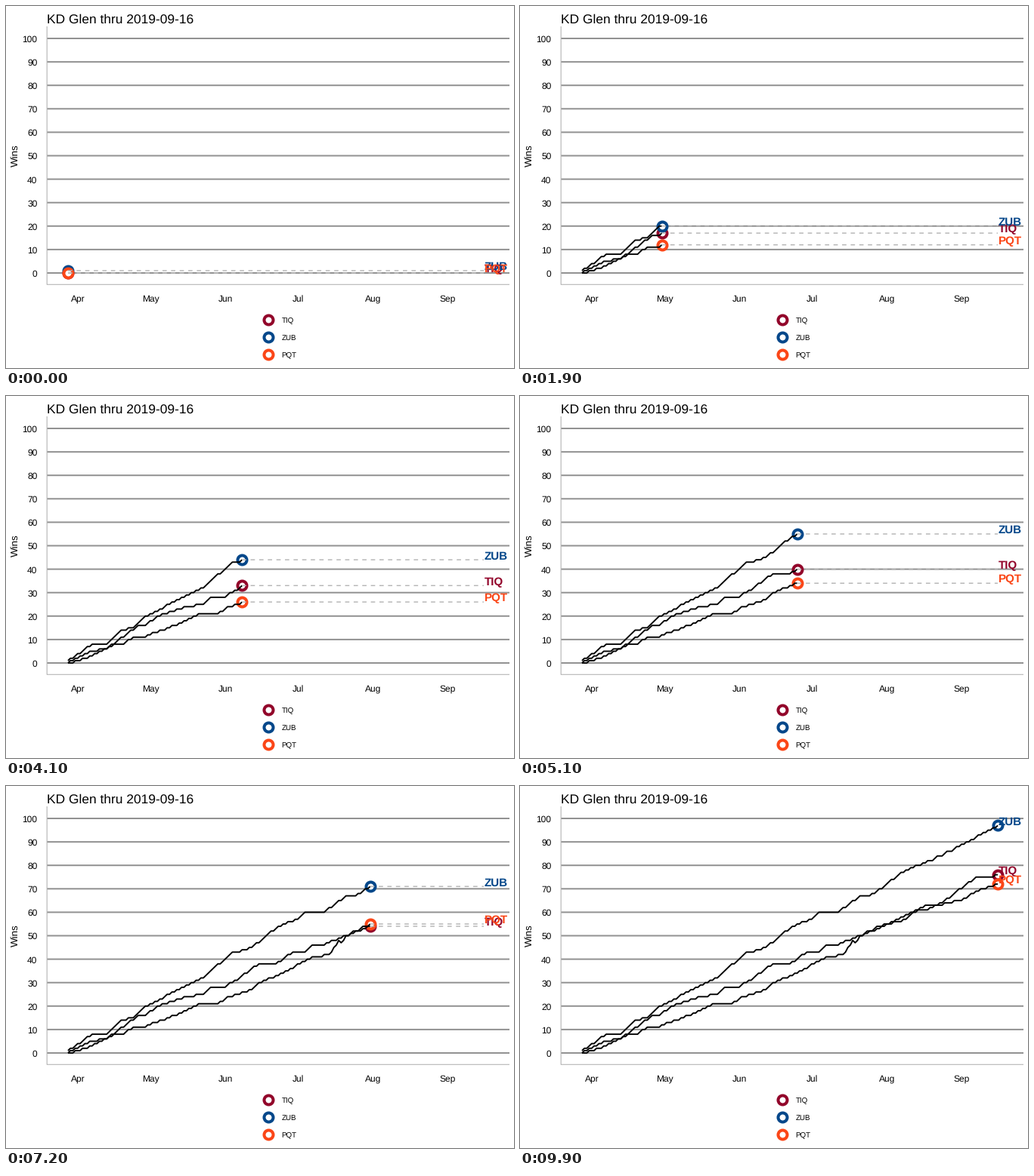
A matplotlib script that plays this animation: 672x480 px, repeating every 10000 ms.

```python
import numpy as np
import matplotlib.pyplot as plt
from matplotlib.animation import FuncAnimation

W, H, DPI = 672, 480, 96
PT = 72 / DPI                      # points per pixel
FRAMES, LAST_DAY = 100, 172
X0, X1, Y0 = 82.0, 632.0, 354.0
PER_DAY, PER_WIN = (X1 - X0) / LAST_DAY, 3.11

plt.rcParams.update({"font.family": "Liberation Sans", "text.hinting": "none"})


def win_curve(*turns):
    """Whole wins per day, moving evenly between (day, wins) turning points."""
    return np.round(np.interp(np.arange(LAST_DAY + 1), *zip(*turns)))


TEAMS = [
    ("TIQ", "#92052a", win_curve(
        (0, 0), (9, 5), (16, 6), (29, 16), (32, 16), (37, 20), (49, 24),
        (56, 25), (59, 28), (64, 28), (68, 30), (79, 38), (86, 38), (93, 43),
        (98, 43), (101, 46), (105, 46), (125, 54), (138, 61), (142, 61),
        (149, 64), (163, 75), (169, 75), (172, 76))),
    ("ZUB", "#03478a", win_curve(
        (0, 1), (10, 8), (16, 8), (22, 14), (27, 15), (31, 19), (49, 29),
        (56, 32), (68, 43), (70, 43), (76, 45), (87, 54), (95, 57), (98, 60),
        (106, 60), (115, 67), (119, 67), (125, 71), (132, 77), (144, 82),
        (156, 88), (163, 92), (172, 97))),
    ("PQT", "#fb4617", win_curve(
        (0, 0), (8, 2), (19, 8), (23, 8), (27, 11), (31, 11), (49, 18),
        (54, 21), (62, 21), (66, 24), (74, 26), (81, 31), (89, 34), (101, 41),
        (105, 41), (109, 43), (112, 48), (113, 47), (115, 50), (125, 55),
        (132, 56), (142, 63), (148, 63), (159, 66), (163, 69), (172, 72))),
]

fig = plt.figure(figsize=(W / DPI, H / DPI), dpi=DPI, facecolor="white")
ax = fig.add_axes([0, 0, 1, 1])
ax.set(xlim=(0, W), ylim=(H, 0))
ax.axis("off")


def label(x, y, text, px, **kw):
    kw.setdefault("va", "baseline")
    return ax.text(x, y, text, fontsize=px * PT, **kw)


def stroke(xs, ys, color, px, **kw):
    kw.setdefault("solid_capstyle", "butt")
    return ax.plot(xs, ys, color=color, lw=px * PT, snap=False, **kw)[0]


def ring(x, y, color):
    return ax.plot([x], [y], "o", ms=12 * PT, mew=4 * PT, mfc="white",
                   mec=color, snap=False, zorder=3)[0]


def draw_chart():
    label(54, 23, "KD Glen thru 2019-09-16", 17.4)
    label(12, 198.5, "Wins", 13.4, rotation=90, ha="center", va="center")
    for wins in range(0, 101, 10):
        y = Y0 - wins * PER_WIN
        stroke([54, 666], [y, y], "#929292", 2, zorder=1)
        label(41.5, y + 4.8, str(wins), 12, ha="right")
    stroke([54.2, 54.2], [27, 369.5], "#b4b4b4", 1.1, zorder=1)
    stroke([54, 666], [369.3, 369.3], "#b4b4b4", 1.1, zorder=1)
    for month in range(4, 10):
        date = np.datetime64(f"2019-{month:02d}-01")
        day = int((date - np.datetime64("2019-03-28")).astype(int))
        name = "Apr May Jun Jul Aug Sep".split()[month - 4]
        label(X0 + day * PER_DAY + 0.4, 392, name, 12, ha="center")
    for i, (name, color, _) in enumerate(TEAMS):
        y = 416.2 + 23 * i
        ring(347.2, y, color)
        label(364.6, y + 3.8, name, 9.7)


draw_chart()
days = X0 + np.arange(LAST_DAY + 1) * PER_DAY
movers = []
for name, color, wins in TEAMS:
    movers.append((
        Y0 - wins * PER_WIN,
        ring(X0, Y0, color),
        stroke([], [], "black", 1.9, zorder=4, solid_joinstyle="round"),
        stroke([], [], "#b4b4b4", 1.42, zorder=5, dashes=(4, 4),
               dash_capstyle="butt"),
        label(X1 + 0.8, Y0, name, 15.1, color=color, weight="bold", zorder=6),
    ))


def update(frame):
    day = min(LAST_DAY, int((frame + 0.5) * LAST_DAY / (FRAMES - 1)))
    x = days[day]
    for ys, head, trail, guide, tag in movers:
        y = ys[day]
        head.set_data([x], [y])
        trail.set_data(days[:day + 1], ys[:day + 1])
        guide.set_data([x, X1], [y, y])
        tag.set_y(y - 0.8)
    return []


anim = FuncAnimation(fig, update, frames=FRAMES, interval=100,
                     init_func=lambda: update(0), repeat=True, repeat_delay=0)
plt.show()
```
